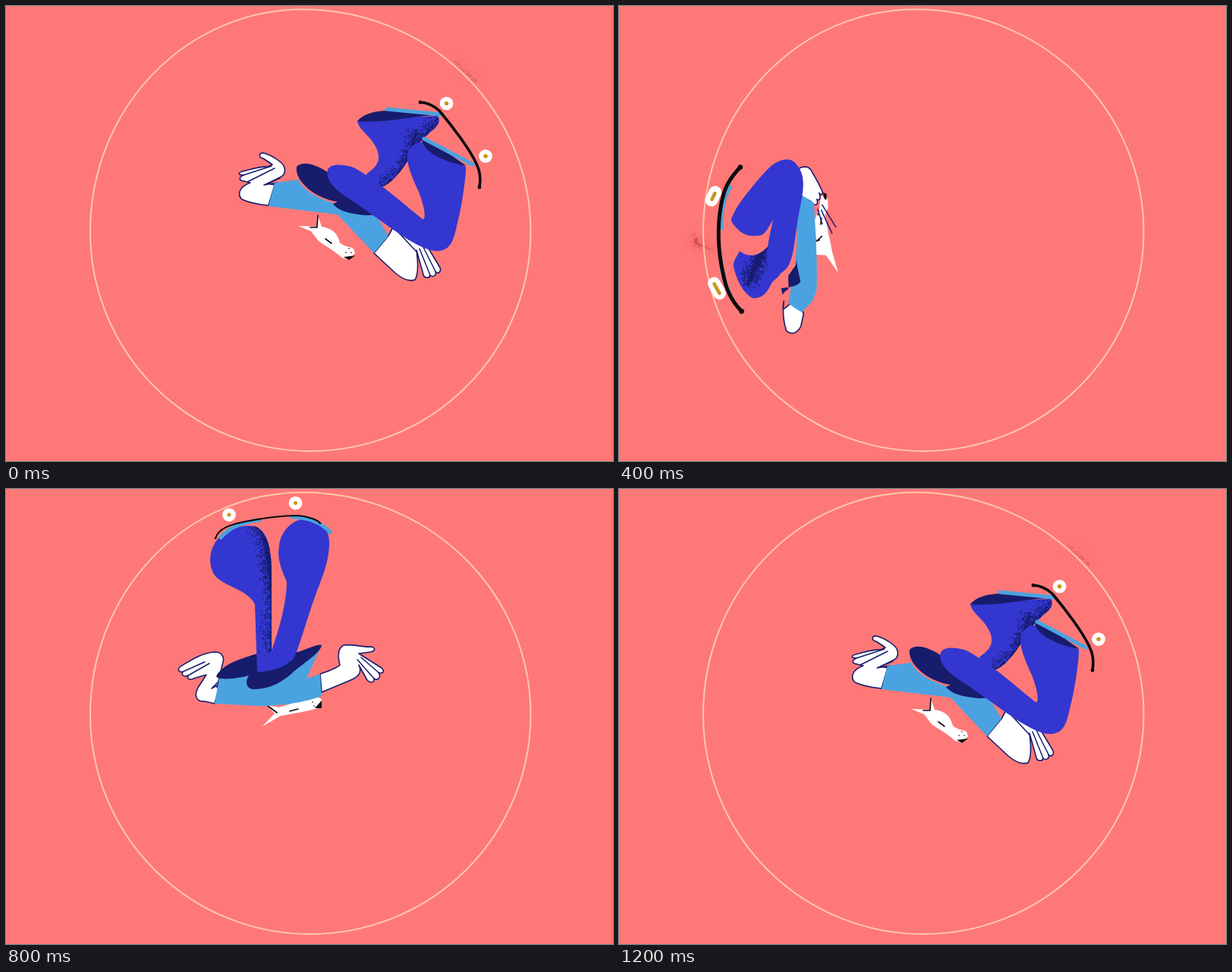
An HTML page with a canvas that plays this animation: 800x600 px, repeating every 1.24 s.

```html
<!DOCTYPE html>
<html lang="en">
<head>
<meta charset="utf-8">
<title>Loop skater</title>
<style>
html, body { margin: 0; width: 100%; height: 100%; overflow: hidden; background: #ff7878; }
canvas { display: block; width: 800px; height: 600px; }
</style>
</head>
<body>
<canvas id="stage" width="800" height="600"></canvas>
<script>
const ctx = document.getElementById('stage').getContext('2d');
const CX = 401, CY = 296, STEP = 80, LOOP = 1240, N = 90;
const BLUE = '#3337cf', NAVY = '#171c6c', SKY = '#4aa3e0', INK = '#0d0a0c';

// Hand-drawn ring, its top a little left of the middle
const RING = new Path2D('M391 4.500A300.500 293 0 0 1 691.500 297.500A290.500 289.500 0 0 1 401 587A290 289.500 0 0 1 111 297.500A280 293 0 0 1 391 4.500Z');

// Place on the ring in degrees, one per step
const ANGLES = [-33, 7, 60, 113, 149, 177, 201, 220, 237, 248, 257, 263, 269, 279, 298, 327];

// Key poses; "at" is the step, "w" the line widths of board, wheels and hubs.
// Limbs start at the hip or sleeve so that poses blend into each other.
const POSES = [
  {
    at: 0, w: [3.6, 17.6, 5.5],
    shade: 'M590 72L620 100',
    head: 'M385 290L410 291L411 276L416 291C430 293 437 300 440 312C446 318 453 317 458 320L460 326L452 335L443 332C432 322 420 316 412 310L402 297Z',
    visor: 'M460 329L452 335L445 331Z',
    ink: 'M421 307L429 313M411 276L410 292L401 292M452 320h.1M448 325h.1M455 325h.1',
    armT: 'M354 236L345 234L361 226C370 222 369 212 362 206C356 201 347 196 340 194C332 193 333 200 339 201L351 209L345 212C335 211 325 215 312 218C305 220 306 223 313 223C307 226 306 230 314 231C318 232 320 233 322 233C308 238 304 248 311 255C320 259 335 262 346 263Z',
    armL: 'M504 303L510 292L545 315L557 320L572 345C574 351 569 354 566 350C568 356 562 358 559 355C558 360 551 359 550 354L541 322C544 345 543 355 539 361C530 364 520 358 513 352L485 326Z',
    lines: 'M350 211L313 223M354 214L318 232M361 227L340 236L357 233M550 318L566 350M545 320L559 355M513 294L541 324',
    torso: 'M354 233L385 229C390 240 405 252 432 260C440 270 470 276 488 276L504 303L485 326L437 275L346 264Z',
    hem: 'M383 212C390 204 408 208 425 220L440 235L490 268C497 276 480 277 465 275C448 273 436 268 431 261L437 258C410 255 380 232 383 212Z',
    legA: 'M490 240C480 235 470 225 477 220C492 210 494 200 488 187C480 170 466 165 463 152C485 150 550 145 569 145C573 150 570 158 563 163C550 174 538 186 530 203C517 224 503 238 490 240Z',
    grainA: 'M568 148C552 172 536 180 526 206C518 222 505 235 493 238M540 165L530 205',
    legB: 'M424 216C428 207 445 209 458 213C490 230 525 262 549 281C554 283 552 265 544 245C533 222 524 198 532 188C538 181 545 178 552 180L606 212C607 222 600 270 594 290C590 310 585 322 570 323C555 324 530 309 515 298C500 288 465 262 452 254C436 244 420 230 424 216Z',
    cuffA: 'M463 152C470 143 485 138 503 138L572 144C540 144 500 155 463 152Z',
    cuffB: 'M548 177C552 194 578 206 607 211L560 178Z',
    shoeA: 'M502 136L574 143',
    shoeB: 'M551 175L615 209',
    board: 'M546 127C556 127 563 131 571 138C588 158 612 190 620 208C625 218 626 228 624 239',
    wheels: 'M580.500 128.500h.1M632 198h.1',
    hubs: 'M580.500 128.500h.1M632 198h.1'
  },
  {
    at: 3, w: [4.8, 14.5, 2.4],
    shade: 'M165 480C185 525 250 572 340 583',
    head: 'M428 505C400 509 360 512 332 513L318 514L290 495L278 478L253 455C253 449 257 446 262 447L308 472C315 476 312 482 306 484L310 490L345 501Z',
    cap: 'M278 477L253 455C253 449 257 446 262 447L308 472C315 476 312 482 306 484L277 475',
    visor: 'M262 456L278 467L264 469Z',
    ink: 'M292 488L290 499M303 488C308 495 305 501 298 501M310 500L317 503M322 502L326 503M318 507L324 508M308 490C322 498 335 502 341 505',
    armT: 'M446 537L433 552C440 557 460 552 478 549C490 546 500 538 511 532C516 528 514 525 509 527C517 520 514 517 508 519C512 514 506 512 498 514L470 523L455 528L457 519Z',
    armL: 'M338 525L330 523L322 520L318 517Z',
    lines: 'M508 519L470 537M509 527L478 541M456 526L446 543',
    torso: 'M436 545C420 540 400 535 372 527L340 526L316 516C345 509 420 510 457 516C452 530 446 540 440 545Z',
    hem: 'M368 528C390 530 430 533 456 528L432 541L415 544C425 546 430 549 430 552C422 560 412 567 400 569L385 558L400 540Z',
    legA: 'M405 560C410 545 395 535 370 534C345 535 325 530 310 535L283 547C284 555 300 557 312 560C340 569 375 571 392 567Z',
    grainA: 'M286 547C310 536 360 538 402 545M310 554C340 560 370 564 400 556',
    legB: 'M345 540C325 545 305 535 290 522C275 510 258 490 245 470C255 490 278 510 280 530C278 540 262 541 252 532C232 515 216 495 216 472C217 452 228 443 240 445C254 449 262 463 275 477L338 524C346 530 350 536 345 540Z',
    grainB: 'M247 473C262 498 280 515 300 532C315 542 330 544 345 540',
    shoeA: 'M388 567C360 570 330 566 303 558',
    shoeB: 'M273 543C255 537 234 523 215 502',
    board: 'M456 555C430 568 390 574 345 571C298 567 250 545 217 506C200 485 190 462 181 433',
    wheels: 'M420 575.500L366 578.500M215 511L188.500 479',
    hubs: 'M420 576L369 579M213 508L193 483'
  },
  {
    at: 6, w: [5, 17.6, 5.5],
    shade: 'M110 258C111 225 115 195 128 160',
    head: 'M307 290L302 268L283 271L300 262C294 250 300 238 311 232L315 222C313 214 317 208 322 208L331 210L326 227L322 232C322 245 316 258 312 268Z',
    visor: 'M325 209L332 211L328 221Z',
    ink: 'M315 239L313 249M302 265L283 271M290 266L301 264M320 213h.1M319 219h.1',
    armT: 'M218 299L207 308L213 281C200 292 186 306 185 317C185 328 200 333 210 331L228 321Z',
    armL: 'M303 163L305 149C309 134 318 126 328 126C340 127 345 133 345 143L347 184C346 190 341 189 341 183C341 195 334 196 333 190C333 200 326 200 324 195L322 187Z',
    lines: 'M341 183L342 150M333 190L338 155M324 187L334 163',
    torso: 'M217 300L243 270C265 240 290 205 301 163L322 188C305 220 285 260 262 297L228 321Z',
    hem: 'M208 308L211 284C220 282 235 280 243 272L265 236L240 280L217 298Z',
    legA: 'M240 240C225 268 210 268 200 280C188 298 175 310 160 308C145 300 149 275 155 260C163 242 175 232 183 222C195 238 220 235 243 208Z',
    grainA: 'M243 210C225 236 195 242 163 250M235 225L175 243',
    legB: 'M208 270C212 250 222 240 245 208C225 225 210 238 195 240C178 235 172 215 174 195C174 180 180 175 190 173L270 143C290 139 302 145 301 160C302 185 280 215 265 240C250 265 240 285 222 282C212 280 205 276 208 270Z',
    shoeA: 'M136 262C136 248 139 235 146 222',
    shoeB: 'M163 188C170 172 180 155 193 149',
    board: 'M137 272C133 255 135 245 141 232C150 210 165 175 175 158C180 148 190 141 199 137',
    wheels: 'M122 239h.1M156 156.500h.1',
    hubs: 'M122 239h.1M156 156.500h.1'
  },
  {
    at: 8, w: [4.2, 17.6, 5],
    head: 'M331 305L345 285L325 272L347 277C350 265 358 257 367 258C374 260 377 261 384 258C386 251 392 249 399 250L403 258L396 268L385 268C375 279 365 282 357 283Z',
    visor: 'M402 256L397 268L392 263Z',
    ink: 'M362 277L372 272M326 273L345 281L341 290M388 258h.1M391 263h.1',
    armT: 'M258 272L250 276C250 262 243 255 234 256C226 258 222 264 222 271C212 268 205 276 209 283C212 288 218 289 222 286L215 315C213 333 225 339 237 331L272 298Z',
    armL: 'M362 197C376 185 390 173 402 172C413 171 419 181 416 190L408 204L426 198C433 198 433 203 428 205C438 204 439 210 432 212L410 224C400 231 388 234 383 228C380 219 386 209 392 197C384 206 376 215 367 222Z',
    lines: 'M428 205L404 215M432 212L408 219M258 274L229 305M222 271L213 276L217 287M222 271L222 287',
    torso: 'M252 262L270 250L318 212L338 213L362 196L367 222C340 240 290 280 272 298L258 272L262 263Z',
    hem: 'M223 265C235 255 255 250 270 244L300 232C290 247 270 258 250 264Z',
    legA: 'M256 246C260 225 268 200 265 184L222 185C205 184 193 178 196 165C200 145 208 125 220 116C235 106 255 110 266 124C280 145 288 175 286 200L275 240Z',
    grainA: 'M225 115C252 105 280 135 286 205M245 112C272 122 284 160 285 200',
    legB: 'M257 246C262 235 270 222 277 212C300 190 325 170 322 153C305 135 285 130 275 112C268 95 275 75 290 62C296 56 302 53 309 55C318 75 345 140 353 157C345 185 330 200 310 215C290 235 275 250 257 246Z',
    shoeA: 'M206 141C212 122 222 105 231 91',
    shoeB: 'M295 57C305 50 315 49 323 51',
    board: 'M203 125C205 110 215 99 232 88C255 74 285 58 305 49C315 45 325 46 331 47',
    wheels: 'M210.500 86.500h.1M285.500 38.500h.1',
    hubs: 'M210.500 86.500h.1M285.500 38.500h.1'
  },
  {
    at: 10, w: [2, 17.6, 5],
    head: 'M338 313L354 296L344 285L360 288L385 280L401 278C403 273 410 273 416 277L416 288L408 290C395 293 375 297 362 299Z',
    visor: 'M416 279L416 289L407 289Z',
    ink: 'M374 293L385 290M345 286L357 295M404 281h.1M406 286h.1',
    armT: 'M284 250L278 262L285 232C289 222 285 215 275 215C258 216 245 225 230 234C225 238 228 242 233 241C230 246 236 248 240 246C238 252 244 252 250 249L264 245L253 262C247 274 252 281 262 280L275 283Z',
    armL: 'M414 244C425 240 437 236 440 232C437 220 437 210 445 206C458 204 470 209 482 208C488 210 486 214 480 215L465 217L495 236C500 241 496 244 491 242C495 249 490 253 485 250C486 256 480 256 476 252L465 232C470 243 464 248 452 253L416 268Z',
    lines: 'M233 241L262 228M240 246L268 230M284 250L271 263L280 258M491 242L468 222M485 250L463 225',
    torso: 'M281 249L320 246L325 264L380 240L415 208L396 250L414 244L416 273C395 281 360 287 330 286L275 283Z',
    hem: 'M277 247C285 232 305 225 328 218L350 214L385 215C400 210 412 204 416 206C415 215 395 228 380 240C365 255 345 265 325 264C315 262 316 252 320 246C305 250 280 253 277 247Z',
    legA: 'M331 241L328 152C318 132 290 130 276 115C265 100 268 78 280 65C290 52 315 45 330 50C345 57 350 80 350 110L350 213L340 241Z',
    grainA: 'M325 48C352 60 350 110 349 215M342 65L349 130',
    legB: 'M331 241L350 213C360 185 370 150 370 122C362 105 357 90 360 75C362 55 378 40 395 39C412 38 425 50 426 68C427 95 415 120 408 140C395 175 385 215 378 225C365 236 350 241 331 241Z',
    shoeA: 'M283 64C295 50 315 43 334 41',
    shoeB: 'M377 37C395 37 415 43 427 57',
    board: 'M276 65C280 52 295 47 315 43C340 38 365 35 385 35C400 36 412 42 414 45',
    wheels: 'M294 34h.1M381.500 18.500h.1',
    hubs: 'M294 34h.1M381.500 18.500h.1'
  },
  {
    at: 12, w: [3.6, 17.6, 5],
    head: 'M337 305L358 299L355 281L366 288C375 284 395 285 403 296L412 297C420 297 424 303 423 306L419 313L410 312L390 308L365 304Z',
    visor: 'M421 306L418 314L409 311Z',
    ink: 'M376 303L389 303M356 281L358 298L348 300M411 300h.1M408 305h.1',
    armT: 'M288 273L270 287L293 252C297 238 293 226 283 224C275 222 268 226 262 232L238 264C235 270 240 272 245 268C243 276 249 277 254 272C252 280 258 281 263 275L277 256L252 295C246 312 252 319 265 318L299 303Z',
    armL: 'M417 263L458 270C448 260 437 250 437 240C438 231 450 229 465 232L493 235C499 237 497 242 491 242L480 243L501 264C506 270 500 273 496 269C500 276 494 279 489 274C490 279 485 280 481 275L470 254C482 280 480 292 475 296C470 300 462 300 455 298L415 288Z',
    lines: 'M245 268L267 243M254 272L275 247M288 274L268 288L280 282M496 269L477 248M489 274L471 252',
    torso: 'M288 275L312 262L300 246L284 236L313 241L340 250L412 224L396 251L417 263L415 288L360 276L299 303Z',
    hem: 'M283 236C290 228 300 224 312 224L350 238L412 222C410 235 385 248 365 255C345 262 315 265 304 258C303 252 310 245 313 241C300 240 287 240 283 236Z',
    legA: 'M320 236C308 228 306 215 316 210C335 200 370 192 378 173C350 173 320 171 298 166C292 160 294 153 298 151C288 150 280 145 282 138C288 122 308 105 321 88C335 105 365 130 390 150C402 158 408 166 406 175C400 195 375 205 360 215Z',
    grainA: 'M338 106C350 122 375 142 404 168M350 212L390 198',
    legB: 'M318 236C312 225 325 214 345 212C375 208 410 195 422 180C412 165 402 150 390 143C378 137 371 130 376 122C383 112 415 95 436 78C438 85 447 130 452 150L459 187C435 205 415 215 395 225C370 236 340 240 318 236Z',
    cuffA: 'M281 140C282 125 300 110 322 88C320 112 305 140 282 143Z',
    cuffB: 'M374 131C377 115 400 104 436 79C432 102 410 132 374 133Z',
    shoeA: 'M299 117L333 65',
    shoeB: 'M390 112L443 65',
    board: 'M325 47C333 37 343 35 357 36C385 39 410 42 435 47C450 51 460 59 462 69',
    wheels: 'M355 22.500h.1M440.500 35.500h.1',
    hubs: 'M355 22.500h.1M440.500 35.500h.1'
  }
];
POSES.push({ ...POSES[0], at: 15 });

const cache = {};
// Evenly spaced points along every stroke of a path
function sample(d) {
  return cache[d] ||= d.split('M').slice(1).map(s => {
    const p = document.createElementNS('http://www.w3.org/2000/svg', 'path');
    p.setAttribute('d', 'M' + s);
    const len = p.getTotalLength();
    const pts = Array.from({ length: N }, (_, i) => {
      const q = p.getPointAtLength(len * i / (N - 1));
      return [q.x, q.y];
    });
    return { pts, len };
  });
}

function turn([x, y], deg) {
  const r = deg * Math.PI / 180, c = Math.cos(r), s = Math.sin(r);
  return [CX + (x - CX) * c - (y - CY) * s, CY + (x - CX) * s + (y - CY) * c];
}

const mix = (a, b, k) => a + (b - a) * k;

// One part at a given blend: a path to paint and its points
function blend(a, b, k, angle, name) {
  const near = k < .5 ? a : b;
  if (!near[name]) return null;
  if (k === 0) return { path: new Path2D(a[name]), strokes: sample(a[name]) };
  const spin = p => angle - ANGLES[p.at];
  const from = sample(a[name] || b[name]), to = sample(b[name] || a[name]);
  const spinA = spin(a[name] ? a : b), spinB = spin(b[name] ? b : a);
  const path = new Path2D();
  const strokes = sample(near[name]).map((s, j) => {
    const f = from[j], g = to[j], one = k < .5 ? spinA : spinB;
    const pts = s.pts.map((p, i) => {
      if (!f || !g) return turn(p, one);
      const u = turn(f.pts[i], spinA), v = turn(g.pts[i], spinB);
      return [mix(u[0], v[0], k), mix(u[1], v[1], k)];
    });
    pts.forEach((p, i) => i ? path.lineTo(...p) : path.moveTo(...p));
    if (/Z/.test(near[name])) path.closePath();
    return { pts, len: s.len };
  });
  return { path, strokes };
}

function fill(part, color) {
  if (!part) return;
  ctx.fillStyle = color;
  ctx.fill(part.path);
}

function line(part, color, width) {
  if (!part) return;
  ctx.strokeStyle = color;
  ctx.lineWidth = width;
  ctx.stroke(part.path);
}

// Speckles gathered around a line, kept inside a shape
function grain(part, inside, color, spread, density) {
  if (!part) return;
  let seed = 7;
  const rnd = () => (seed = seed * 16807 % 2147483647) / 2147483647;
  ctx.save();
  if (inside) ctx.clip(inside.path);
  ctx.fillStyle = color;
  for (const { pts, len } of part.strokes) {
    for (let i = 0; i < len * density; i++) {
      const [x, y] = pts[Math.floor(rnd() * N)];
      const a = rnd() * 2 * Math.PI, r = spread * rnd() ** 1.8;
      ctx.fillRect(x + Math.cos(a) * r, y + Math.sin(a) * r, 1.4, 1.4);
    }
  }
  ctx.restore();
}

function draw(step) {
  const angle = ANGLES[step];
  const i = POSES.findLastIndex(p => p.at <= step);
  const a = POSES[i], b = POSES[i + 1] || a;
  let k = 0;
  if (step !== a.at) k = (angle - ANGLES[a.at]) / (ANGLES[b.at] - ANGLES[a.at]);
  const get = name => blend(a, b, k, angle, name);
  const [boardW, wheelW, hubW] = a.w.map((w, j) => mix(w, b.w[j], k));

  ctx.fillStyle = '#ff7878';
  ctx.fillRect(0, 0, 800, 600);
  ctx.lineCap = ctx.lineJoin = 'round';

  grain(get('shade'), null, 'rgba(205,75,90,.16)', 15, 6);
  line({ path: RING }, '#ffc9a8', 2);

  fill(get('head'), '#fff');
  line(get('cap'), NAVY, 1.5);
  fill(get('visor'), INK);
  line(get('ink'), INK, 1.6);
  for (const name of ['armT', 'armL']) {
    const arm = get(name);
    fill(arm, '#fff');
    line(arm, NAVY, 1.6);
  }
  line(get('lines'), NAVY, 1.5);
  fill(get('torso'), SKY);
  fill(get('hem'), NAVY);

  for (const side of ['A', 'B']) {
    const leg = get('leg' + side);
    fill(leg, BLUE);
    grain(get('grain' + side), leg, NAVY, 16, 7);
    fill(get('cuff' + side), NAVY);
  }
  line(get('shoeA'), SKY, 5);
  line(get('shoeB'), SKY, 5);

  const board = get('board');
  line(board, INK, boardW);
  const pts = board.strokes[0].pts;
  ctx.fillStyle = INK;
  for (const p of [pts[0], pts[N - 1]]) {
    ctx.beginPath();
    ctx.arc(...p, boardW * .68, 0, 2 * Math.PI);
    ctx.fill();
  }
  line(get('wheels'), '#fff', wheelW);
  line(get('hubs'), '#c8981c', hubW);
}

let shown = -1;
function tick() {
  const step = Math.floor(performance.now() % LOOP / STEP);
  if (step !== shown) draw(shown = step);
  requestAnimationFrame(tick);
}
tick();
</script>
</body>
</html>
```
